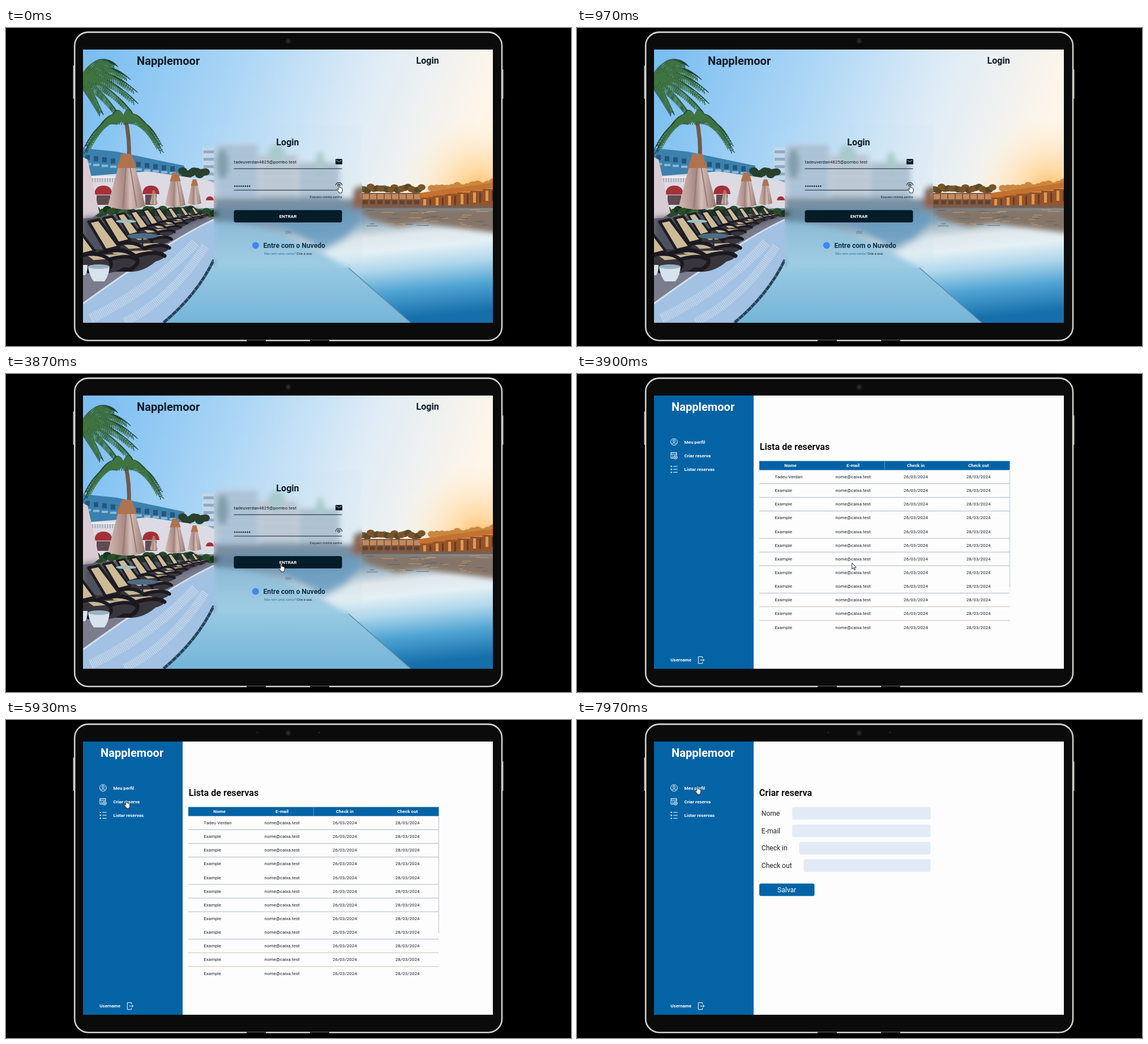
These frames come from a looping animation (998 by 561 pixels, 8 s). An HTML page:

```html
<!DOCTYPE html>
<html lang="pt">
<head>
<meta charset="utf-8">
<title>Reservas</title>
<style>
html,body{margin:0;width:100%;height:100%;overflow:hidden;background:#000}
svg{display:block;width:100vw;height:100vh}
text{font-family:Roboto,Arial,sans-serif;font-size:8.04px;fill:#1c2530}
.b{font-weight:700}
.w{fill:#fff}
.mid{text-anchor:middle}
.end{text-anchor:end}
.xl{font-size:20.1px;font-weight:700}
.l{font-size:16.1px;font-weight:700}
.m{font-size:12.07px}
.s{font-size:6.03px}
.ink{fill:#0e1c28}
.icon{fill:none;stroke:#fff;stroke-width:1}
</style>
</head>
<body>
<svg viewBox="0 0 998 561">
<defs>
  <clipPath id="screen"><rect x="136" y="38" width="724" height="482"/></clipPath>
  <clipPath id="card"><rect x="367" y="171" width="262" height="252"/></clipPath>
  <filter id="blur" filterUnits="userSpaceOnUse" x="136" y="38" width="724" height="482"><feGaussianBlur stdDeviation="5"/></filter>
  <filter id="soft" x="-30%" y="-30%" width="160%" height="160%"><feGaussianBlur stdDeviation="5"/></filter>
  <linearGradient id="sky" gradientUnits="userSpaceOnUse" x1="150" y1="38" x2="800" y2="270">
    <stop offset="0" stop-color="#79bdf1"/><stop offset=".4" stop-color="#b0d8f6"/>
    <stop offset=".7" stop-color="#dfecf6"/><stop offset="1" stop-color="#fff6ea"/>
  </linearGradient>
  <radialGradient id="sun" gradientUnits="userSpaceOnUse" cx="835" cy="292" r="150">
    <stop offset="0" stop-color="#ffb65c"/><stop offset=".3" stop-color="#ffd79c" stop-opacity=".85"/>
    <stop offset="1" stop-color="#fff6ea" stop-opacity="0"/>
  </radialGradient>
  <linearGradient id="pool" gradientUnits="userSpaceOnUse" x1="590" y1="318" x2="610" y2="522">
    <stop offset="0" stop-color="#5f8099"/><stop offset=".15" stop-color="#98b0c0"/>
    <stop offset=".28" stop-color="#dfe7eb"/><stop offset=".4" stop-color="#e4f0f5"/>
    <stop offset=".56" stop-color="#b0d7ec"/><stop offset=".76" stop-color="#50a4d3"/><stop offset="1" stop-color="#166fab"/>
  </linearGradient>
  <linearGradient id="shallow" x1="0" y1="0" x2="0" y2="1">
    <stop offset="0" stop-color="#86b6d4"/><stop offset=".4" stop-color="#9bcbe3"/><stop offset="1" stop-color="#74b4d8"/>
  </linearGradient>
  <linearGradient id="fabric"><stop offset="0" stop-color="#d2b8b3"/><stop offset=".45" stop-color="#a98a83"/><stop offset=".6" stop-color="#d6beb8"/><stop offset="1" stop-color="#94776f"/></linearGradient>
</defs>

<rect width="998" height="561"/>
<g fill="#b9b9b6"><rect x="118.5" y="66" width="3" height="59" rx="1"/><rect x="875.5" y="73" width="3" height="52" rx="1"/></g>
<rect x="121.2" y="7.4" width="754.8" height="543.8" rx="24" fill="#0b0b0b" stroke="#d3d2cb" stroke-width="2.6"/>
<path d="M425 552h34M537 552h34" stroke="#050505" stroke-width="3"/>
<circle cx="498.5" cy="23" r="5" fill="#1d1d1e"/><circle cx="498.5" cy="23" r="2.2" fill="#2c2c2e"/>
<g id="dots" fill="#232325"><circle cx="444" cy="22" r="1.5"/><circle cx="553" cy="22" r="1.5"/></g>

<g id="login" clip-path="url(#screen)">
  <g id="photo">
    <rect x="136" y="38" width="724" height="300" fill="url(#sky)"/>
    <rect x="640" y="100" width="220" height="230" fill="url(#sun)"/>
    <g id="hotel"></g>
    <g id="shore"></g>
    <path d="M340 318H860V520H340Z" fill="url(#pool)"/>
    <g id="glints"></g>
    <path d="M340 342Q430 340 490 366Q555 392 605 423L715 520H270Q330 470 367 411Z" fill="url(#shallow)"/>
    <path d="M605 423L715 520" stroke="#5f8ba8" stroke-width="1.6"/>
    <path d="M400 322H600L632 336L598 372L560 392L490 352Z" fill="#5b93ba" opacity=".85" filter="url(#soft)"/>
    <path d="M136 330H367V360L250 440L136 500Z" fill="#7b7c8d"/>
    <path d="M136 486Q200 440 260 400T367 338V411Q330 475 278 520H136Z" fill="#a3c1e2"/>
    <g fill="none" stroke="#cadbee" stroke-dasharray="1.4 1.8">
      <path d="M150 512Q255 462 335 378" stroke-width="17"/>
      <path d="M210 518Q290 480 352 385" stroke-width="15"/>
    </g>
    <path d="M136 486Q200 440 260 400T367 338" fill="none" stroke="#d3e0ef" stroke-width="3"/>
    <path d="M278 520Q338 470 367 409" fill="none" stroke="#25425a" stroke-width="5"/>
    <path d="M278 520Q338 470 367 409" fill="none" stroke="#6f9dbf" stroke-width="5" stroke-dasharray="1 9"/>
    <g id="terrace"></g>
    <g id="palms" fill="none"></g>
    <g id="parasols"></g>
    <path d="M136 334L330 318L362 332L300 352L262 392L170 420L136 410Z" fill="#2b2f38" opacity=".55" filter="url(#soft)"/>
    <g id="loungers"></g>
    <g fill="#d6e2ec"><path d="M145 421h38q-1 15-9 26h-19q-8-10-10-26z"/><path d="M136 418h8q0 12-4 18h-4z"/></g>
    <ellipse cx="164" cy="421" rx="19" ry="4" fill="#9bb0c2"/>
  </g>
  <g clip-path="url(#card)"><use href="#photo" filter="url(#blur)"/><rect x="367" y="171" width="262" height="252" fill="#b9d3e4" opacity=".1"/></g>

  <text class="xl ink" x="231" y="65">Napplemoor</text>
  <text class="l ink" x="724.5" y="63.2">Login</text>
  <text class="l ink mid" x="497.5" y="206.8">Login</text>
  <text class="ink" x="402.5" y="238.6">tadeuverdan4825@pombo.test</text>
  <path d="M402.5 248.2h191M402.5 286h191" stroke="#12212c"/>
  <rect x="582" y="231" width="12" height="9.6" rx="1.2" fill="#0b1822"/>
  <path d="M583.2 233l4.8 3.2 4.8-3.2" fill="none" stroke="#bcd0de" stroke-width="1"/>
  <g id="secret" fill="#0e1c28"></g>
  <g fill="none" stroke="#12212c" stroke-width="1.1"><path d="M582 277.5q2-5 6-5t6 5"/><circle cx="588" cy="277" r="2"/></g>
  <text class="s end" x="593.5" y="299.7">Esqueci minha senha</text>
  <rect x="402.5" y="321.3" width="191" height="21.7" rx="3.5" fill="#051c29"/>
  <text class="b w mid" x="498" y="335">ENTRAR</text>
  <text class="mid" x="498.5" y="362.6" style="fill:#3d6e8e">OU</text>
  <circle cx="440.8" cy="383.5" r="6" fill="#4285f4"/>
  <text class="m b" x="454.5" y="388" style="fill:#0d3148">Entre com o Nuvedo</text>
  <text class="s" x="456" y="400.2" style="fill:#33729b">Não tem uma conta?</text>
  <text class="s ink" x="513.3" y="400.2">Crie a sua.</text>
</g>

<g id="dash" opacity="0">
  <rect x="136" y="38" width="724" height="482" fill="#fdfdfd"/>
  <rect x="136" y="38" width="176" height="482" fill="#0363a5"/>
  <text class="xl w" x="167" y="65">Napplemoor</text>
  <g class="b"><text class="w" x="189.5" y="122.5">Meu perfil</text><text class="w" x="189.5" y="146.6">Criar reserva</text><text class="w" x="189.5" y="170.8">Listar reservas</text><text class="w" x="165.3" y="507.2">Username</text></g>
  <g class="icon">
    <circle cx="171.4" cy="119.8" r="5.8"/><circle cx="171.4" cy="118" r="2"/><path d="M167.3 124q1.2-2.4 4.1-2.4t4.1 2.4"/>
    <path d="M171 148.5h-5v-10h10v5M166 141.3h10M168 144h2M168 146.4h2M171.5 144h2"/><circle cx="174.2" cy="147" r="3" fill="#0363a5"/><path d="M172.6 147h3.2M174.2 145.4v3.2"/>
    <path d="M165.5 163h2.4M165.5 168.2h2.4M165.5 173.4h2.4" stroke-width="2"/><path d="M170.2 163h7.5M170.2 168.2h7.5M170.2 173.4h7.5"/>
    <path d="M221.5 501v-2.3h-7.2v12h7.2v-2.3M217.5 504.7h7M222.2 502.2l2.5 2.5-2.5 2.5"/>
  </g>
  <g id="list">
    <text class="l" x="322.8" y="133.5" style="fill:#111">Lista de reservas</text>
    <rect x="322" y="153.5" width="442.5" height="16" fill="#0363a5"/>
    <path d="M543.3 153.5v16" stroke="#6da3cb" stroke-width=".8"/>
    <path d="M764.5 169.5V376" stroke="#b4bfd2" stroke-width=".9"/>
    <g id="rows"></g>
  </g>
  <g id="form" opacity="0">
    <text class="l" x="321.8" y="133.5" style="fill:#111">Criar reserva</text>
    <g id="fields"></g>
    <rect x="322" y="288.4" width="97.5" height="22" rx="3" fill="#0363a5"/>
    <text class="m w mid" x="370.6" y="303.5">Salvar</text>
  </g>
</g>

<g id="cursor" stroke="#161616" stroke-width=".9" stroke-linejoin="round" fill="#fff">
  <path id="hand" d="M3 9.5V1.6a1.1 1.1 0 0 1 2.2 0V6.4q1.5-.6 1.8.5 1.4-.4 1.7.6 1.4-.2 1.4 1.2V12q0 1.4-1 2.4V16H4v-1.2L.7 10.7q-.7-1.4.5-1.6T3 10.4Z"/>
  <path id="arrow" opacity="0" d="M3.7 .4V11.2L6.2 8.9l1.8 4 1.7-.8-1.8-3.8h3.2Z"/>
</g>
</svg>

<script>
const $ = id => document.getElementById(id);
const times = (n, f) => Array.from({length: n}, (_, i) => f(i)).join('');
const poly = (pts, fill) => `<polygon points="${pts}" fill="${fill}"/>`;
const box = (x, y, w, h, fill, extra = '') => `<rect x="${x}" y="${y}" width="${w}" height="${h}" fill="${fill}" ${extra}/>`;
let seed = 11;
const rnd = () => (seed = seed * 16807 % 2147483647) / 2147483647;

// Hotel across the water
const block = (x, y, w, h, fill) => box(x, y, w, h, fill) +
  times(Math.floor(h / 13), r => box(x + 2, y + 6 + r * 13, w - 4, 5, '#8fabc4'));
$('hotel').innerHTML = block(347, 210, 24, 90, '#c3d7e8') + block(371, 205, 75, 100, '#b9cbdc') +
  block(446, 222, 70, 84, '#d2d5da') + block(516, 236, 74, 70, '#bccad6') +
  '<ellipse cx="478" cy="222" rx="15" ry="17" fill="#a8c8ca"/><ellipse cx="555" cy="236" rx="8" ry="18" fill="#a5cac4"/>' +
  box(340, 300, 290, 22, '#71889a') + '<ellipse cx="382" cy="240" rx="11" ry="26" fill="#7c98a4"/>';

// Trees and pavilions on the far shore
const bush = (x, y, r, fill) => `<ellipse cx="${x}" cy="${y}" rx="${r}" ry="${r * .8}" fill="${fill}"/>`;
$('shore').innerHTML =
  times(20, i => bush(620 + i * 6, 287 - rnd() * 8, 7, i % 3 ? '#7a5428' : '#574a2b')) +
  times(13, i => bush(752 + i * 9, 286 - i * .8 - rnd() * 6, 7, '#c98742')) +
  box(612, 291, 248, 29, '#8a5637') +
  times(9, i => box(630 + i * 13, 293, 11, 9, '#c08a62') + box(630 + i * 13, 304, 9, 7, '#5c4337')) +
  times(6, i => {
    const x = 732 + i * 22, y = 291 - i * 3;
    return poly(`${x},${y} ${x + 25},${y - 4} ${x + 28},${y + 7} ${x - 3},${y + 8}`, '#c4722f') +
      box(x, y + 8, 24, 22 + i * 2, '#96532a') + box(x + 5, y + 11, 5, 18, '#e09a52') + box(x + 16, y + 11, 3, 18, '#633c28');
  }) + box(629, 313, 231, 6, '#6e594f');
$('glints').innerHTML =
  `<g filter="url(#soft)">${poly('625,318 870,318 870,362 735,344 690,350 640,335', '#857468')}</g>` +
  times(40, () => box(632 + rnd() * 215, 320 + rnd() * 30, 6 + rnd() * 16, 1.2, rnd() < .5 ? '#4b6276' : '#d0a076', 'opacity=".7"'));

// Terrace building and hedge
const awning = (x, y, r) => `<path d="M${x - r} ${y + 7}q1-${r}  ${r}-${r}t${r} ${r}z" fill="#a5303a"/>`;
$('terrace').innerHTML = poly('136,212 195,218 315,243 315,266 136,266', '#3c80ae') +
  times(11, i => box(140 + i * 15, 224 + i * 2, 8, 9, '#24577d') + box(139 + i * 15, 238 + i * 1.6, 11, 4, '#8db8d6')) +
  times(9, i => bush(312 + i * 5, 259 - rnd() * 7, 8, '#28402c')) +
  poly('136,262 250,253 355,268 367,273 367,318 136,322', '#dcdbe4') +
  times(10, i => box(152 + i * 4.4, 265, 2, 7, '#a2abb8')) +
  box(150, 262, 48, 2, '#f3f3f6') + awning(172, 287, 16) + awning(256, 286, 15) + awning(360, 297, 7) +
  box(160, 295, 24, 17, '#604b50') + box(246, 294, 20, 18, '#604b50') +
  times(34, i => bush(137 + i * 7, 319 + rnd() * 9, 8, i % 3 ? '#2c4f28' : '#1a3520')) +
  '<circle cx="205" cy="332" r="7" fill="#50e070" filter="url(#soft)"/>';

// Fronds are curves with leaflets hanging from both sides
const frond = (x, y, a, len, lift, sag) => {
  const dx = Math.cos(a) * len, dy = Math.sin(a) * len * lift, drop = len * sag * Math.abs(Math.cos(a));
  return times(26, i => {
    const t = i / 25, px = x + dx * t, py = y + dy * t * (1.5 - t * .5) - len * .2 * t * (1 - t) + drop * t * t;
    const l = len * .2 * (1.1 - t * .6), lean = dx / len * l * .6;
    return `M${px - 1} ${py}l${lean - l * .35} ${l}M${px} ${py}l${lean + l * .35} ${l * .75}`;
  });
};
const crown = (x, y, n, len, from, to, lift, sag) => {
  for (const [color, k] of [['#1d4532', 1], ['#3f7440', .9]])
    $('palms').innerHTML += `<path stroke="${color}" stroke-width="1.2" d="${times(n, i => frond(x, y, from + (to - from) * i / (n - 1), len * k, lift, sag))}"/>`;
};
$('palms').innerHTML = '<path d="M211 160Q219 195 217 232" stroke="#6f5a4a" stroke-width="7"/>';
crown(134, 82, 7, 92, -.9, 1.2, .6, .4);
crown(208, 156, 8, 66, -3.4, .2, .3, .85);

const parasol = (x, y, w, h) => {
  const a = x - w * .13, b = x + w * .13;
  return `<path d="M${a} ${y}H${b}Q${x + w * .35} ${y + h * .5} ${x + w / 2} ${y + h * .92}Q${x} ${y + h * 1.05} ${x - w / 2} ${y + h * .92}Q${x - w * .34} ${y + h * .5} ${a} ${y}Z" fill="url(#fabric)"/>` +
    poly(`${a},${y} ${b},${y} ${x + w * .27},${y + h * .25} ${x - w * .27},${y + h * .25}`, '#b0734f') +
    `<path d="M${x - 1} ${y + h * .25}L${x - w * .1} ${y + h * .95}M${x + w * .1} ${y + h * .25}L${x + w * .27} ${y + h * .93}" stroke="#957a76" stroke-width="${w * .03}"/>`;
};
$('parasols').innerHTML = box(211, 318, 3, 22, '#5a5352') + parasol(213, 222, 66, 100) + parasol(261, 286, 13, 26) +
  parasol(299, 255, 36, 62) + parasol(333, 267, 24, 46) + poly('136,228 144,232 165,326 152,335 136,336', '#d9cbd3');

const lounger = ([x, y, s]) => `<g transform="translate(${x} ${y}) scale(${s})" stroke-linejoin="round" stroke-linecap="round">
  <path d="M-2 50L96 52L132 56Q140 66 118 72Q100 88 78 90H48Q20 74-2 72" fill="#39353d"/>
  <path d="M0 2L18-2L54 46L30 52Z" fill="#cdbb98" stroke="#201d24" stroke-width="5"/>
  <path d="M40 55L110 52L122 58L52 64Z" fill="#c4b596"/>
  <path d="M12 60Q60 42 84 64Q92 76 74 86H42M84 62Q120 52 134 62" fill="none" stroke="#1b1920" stroke-width="7"/></g>`;
$('loungers').innerHTML = [[328, 317, .22], [308, 317, .27], [286, 318, .34], [264, 319, .42], [242, 321, .5], [220, 324, .58], [196, 328, .72], [172, 334, .87]].map(lounger).join('') +
  '<ellipse cx="212" cy="341" rx="18" ry="3" fill="#9fc0c2"/><ellipse cx="241" cy="367" rx="27" ry="5" fill="#4d6c85"/><path d="M241 371v16" stroke="#22303d" stroke-width="3"/>' +
  lounger([146, 340, 1]) + lounger([108, 352, .9]);

// Interface parts
$('secret').innerHTML = times(8, i => `<circle cx="${404.2 + i * 3.72}" cy="279" r="1.2"/>`);

const cols = [377, 487.6, 598.4, 709.2], pitch = 24.13;
const cell = (x, y, s, cls = 'mid') => `<text class="${cls}" x="${x}" y="${y}">${s}</text>`;
$('rows').innerHTML = ['Nome', 'E-mail', 'Check in', 'Check out'].map((s, i) => cell(cols[i], 164, s, 'b w mid')).join('') +
  times(12, i => {
    const y = 184.1 + i * pitch;
    const rule = [3, 7, 11].includes(i) ? '' : `<path d="M322 ${y + 9.4}H764.5" stroke="${i > 8 ? '#c3bda6' : '#a3afc6'}" stroke-width=".9"/>`;
    return cell(349.3, y, i ? 'Example' : 'Tadeu Verdan', '') + cell(cols[1], y, 'nome@caixa.test') +
      cell(cols[2], y, '26/03/2024') + cell(cols[3], y, '28/03/2024') + rule;
  });
$('fields').innerHTML = [['Nome', 380], ['E-mail', 380], ['Check in', 392.6], ['Check out', 400.4]].map(([s, x], i) =>
  cell(325.8, 168.9 + i * 30.7, s, 'm') + box(x, 153.6 + i * 30.7, 624.6 - x, 22.2, '#e2ebf5', 'rx="3.5"')).join('');

// Timeline
const LOOP = 8000;
const play = (id, frames) => $(id).animate(frames, {duration: LOOP, iterations: Infinity});
const cut = (id, steps) => play(id, [...steps, [LOOP, steps[steps.length - 1][1]]]
  .map(([t, opacity]) => ({offset: t / LOOP, opacity, easing: 'step-end'})));

cut('login', [[0, 1], [3900, 0]]);
cut('dash', [[0, 0], [3900, 1]]);
cut('list', [[0, 1], [6700, 0]]);
cut('form', [[0, 0], [6700, 1]]);
cut('dots', [[0, 0], [5030, 1]]);
const pointing = [[0, 1], [2640, 0], [3140, 1], [3900, 0], [5360, 1]];
cut('hand', pointing);
cut('arrow', pointing.map(([t, on]) => [t, 1 - on]));

play('cursor', [
  [0, 584, 275], [1700, 584, 275], [2100, 582, 274.5], [2530, 582, 274.5], [3270, 482, 333],
  [5030, 482, 333], [5470, 208.5, 140], [7500, 208.5, 140], [7940, 208.5, 115.3], [LOOP, 208.5, 115.3]
].map(([t, x, y]) => ({offset: t / LOOP, transform: `translate(${x}px,${y}px)`, easing: 'ease-in-out'})));
</script>
</body>
</html>
```
